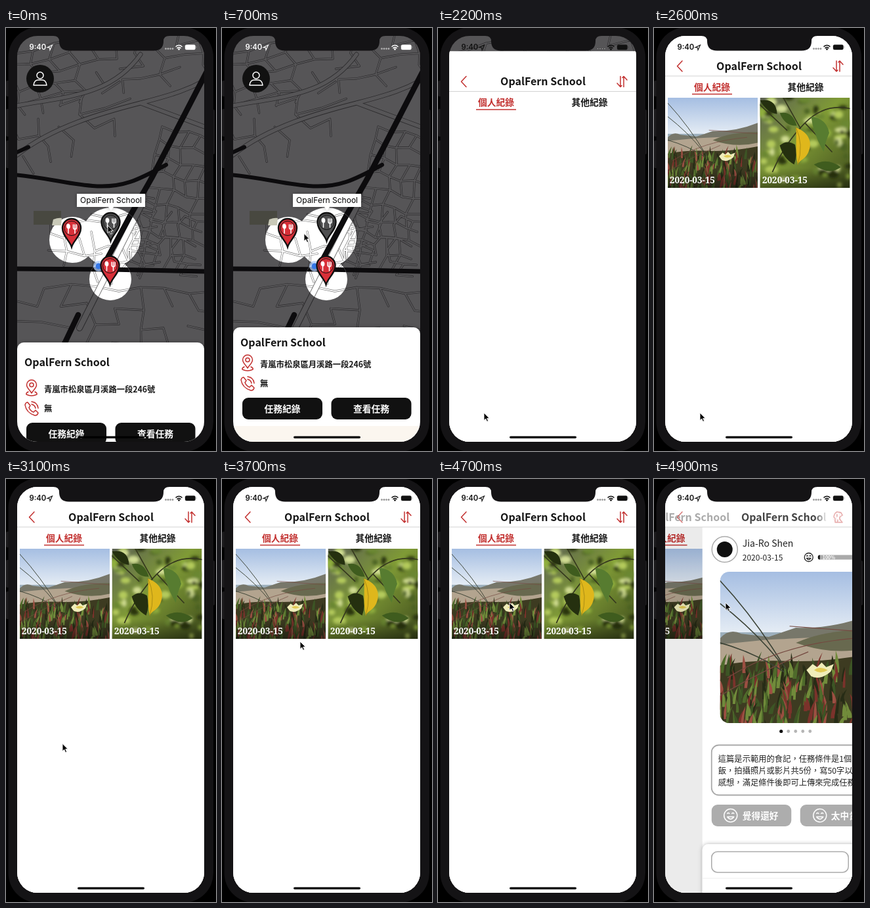
Write an HTML page that moves like this. It is 320x643 px and loops after 5 s.

```html
<!DOCTYPE html>
<html lang="zh-Hant">
<head>
<meta charset="utf-8">
<title>Task map</title>
<style>
html, body { margin: 0; height: 100%; overflow: hidden; background: #000 }
svg { display: block; width: 100vw; height: 100vh }
text { font-family: "Noto Sans CJK TC", "Noto Sans CJK", sans-serif }
.b { font-weight: 700 }
.m { text-anchor: middle }
.ui { font-family: Inter, Roboto, sans-serif }
.date { font: 700 13.5px "Noto Serif", serif; fill: #fff }
.line { fill: none; stroke-linecap: round; stroke-linejoin: round }
.red { stroke: #c2302f; stroke-width: 1.5 }
#map { --bg: #565557; --edge: #2b2a2c; --main: #0c0b0d }
#lit { --bg: #fff; --edge: #777; --main: #0c0b0d }
.ground { fill: var(--bg) }
.edge { stroke: var(--edge) }
.fill { stroke: var(--bg) }
.main { stroke: var(--main) }
</style>
</head>
<body>
<svg viewBox="0 0 320 643">
<defs>
  <clipPath id="screen"><rect x="17" y="12" width="285" height="617" rx="31"/></clipPath>
  <clipPath id="spots"><circle cx="101" cy="322" r="35"/><circle cx="160" cy="318" r="45"/><circle cx="159" cy="382" r="32"/></clipPath>
  <clipPath id="sq"><rect width="100" height="100"/></clipPath>
  <clipPath id="sqRound"><rect width="100" height="100" rx="6"/></clipPath>
  <linearGradient id="sky" x2="0" y2="1"><stop stop-color="#a5bee2"/><stop offset="1" stop-color="#eef3f7"/></linearGradient>
  <linearGradient id="shade" x2="0" y2="1"><stop stop-color="#000" stop-opacity="0"/><stop offset="1" stop-color="#000" stop-opacity=".4"/></linearGradient>
  <linearGradient id="leafBg" x2="1" y2="1"><stop stop-color="#5c6153"/><stop offset=".45" stop-color="#7f9a36"/><stop offset="1" stop-color="#3f4c1c"/></linearGradient>
  <linearGradient id="fade" gradientUnits="userSpaceOnUse" x1="245" x2="264"><stop stop-color="#fff"/><stop offset="1" stop-color="#000"/></linearGradient>
  <mask id="titleMask"><rect width="320" height="643" fill="url(#fade)"/></mask>
  <filter id="soft"><feGaussianBlur stdDeviation="1.6"/></filter>
  <filter id="shadow" x="-20%" y="-20%" width="140%" height="140%"><feDropShadow dx="0" dy="0" stdDeviation="3" flood-opacity=".3"/></filter>

  <g id="streets">
    <rect class="ground" width="320" height="643"/>
    <path class="edge line small" stroke-width="3.2"/>
    <path class="fill line small" stroke-width="1.9"/>
    <g class="line">
      <path class="edge" stroke-width="7" d="M17 193C70 150 150 128 205 114S280 92 302 80M205 114L302 150M17 118C90 104 160 104 205 40"/>
      <path class="fill" stroke-width="5.4" d="M17 193C70 150 150 128 205 114S280 92 302 80M205 114L302 150M17 118C90 104 160 104 205 40"/>
      <path class="edge" stroke-width="10" d="M206 270L112 456"/>
      <path class="fill" stroke-width="8" d="M206 270L112 456"/>
      <path class="main" stroke-width="6" d="M12 223C55 226 85 236 132 240S205 229 244 208M12 191L34 181"/>
      <path class="main" stroke-width="7" d="M12 366L160 367L306 370"/>
      <path class="main" stroke-width="8.5" d="M306 66L222 228L190 284L146 366M110 436L88 482"/>
    </g>
  </g>

  <g id="pin">
    <path d="M0 0C-3-10-14-17-14-29A14 14 0 0 1 14-29C14-17 3-10 0 0Z" stroke="#111" stroke-width="2.4"/>
    <circle cy="-28.5" r="11" fill="none" stroke="#111" stroke-width="1"/>
    <g class="line" stroke="#fff" stroke-width="1.8"><ellipse cx="-5" cy="-31.500" rx="2" ry="3" fill="#fff"/><path d="M-5-28V-21M5-27V-21M2.500-34V-30Q2.500-27 5-27T7.500-30V-34M5-34V-27" stroke-width="1.5"/></g>
  </g>

  <g id="beach" clip-path="url(#sq)">
    <rect width="100" height="46" fill="url(#sky)"/>
    <rect y="40" width="40" height="6" fill="#9db0bd"/>
    <path d="M0 44Q6 37 14 41L32 43L50 37Q75 38 100 28V70H0Z" fill="#77776a"/>
    <path d="M0 48L30 45Q55 44 100 41V72H0Z" fill="#b3a48f"/>
    <path d="M50 47Q70 38 100 38V50Q75 56 50 47" fill="#68694f"/>
    <path d="M0 62Q20 58 45 59T100 54V100H0Z" fill="#3d3b21"/>
    <g id="blades"/>
    <path class="line" stroke="#3b4235" stroke-width=".7" d="M0 6Q24 32 43 64M0 21Q22 38 39 59M0 47Q22 53 42 66"/>
    <path class="line" stroke="#74483f" stroke-width=".5" d="M0 82Q26 66 58 53M46 36L100 40M5 70Q40 48 88 44"/>
    <path d="M57 65L61 61L64 63L67 60L70 63L75 61L73 66Q66 72 60 69Z" fill="#f0edba"/>
    <path d="M62 65Q66 62 71 65Q66 68 62 65" fill="#e2ca55"/>
  </g>

  <g id="leaves" clip-path="url(#sq)">
    <rect width="100" height="100" fill="url(#leafBg)"/>
    <g id="bokeh" filter="url(#soft)"/>
    <path class="line" stroke="#35381e" stroke-width="1.2" d="M14 82Q28 50 50 28T100 12M26 0L45 34M50 28L80 60M0 8L30 36"/>
    <path d="M22 53Q30 46 39 52Q42 64 38 74Q26 68 22 53M0 3Q18 0 19 18Q8 17 0 3" fill="#25300f"/>
    <path d="M57 21Q74 23 77 39Q72 51 71 60Q59 40 57 21" fill="#577c30"/>
    <path d="M22 17Q36 14 41 31Q28 32 22 17M60 74Q75 66 90 77Q76 87 60 74" fill="#3f5c1e"/>
    <path d="M40 33C56 39 58 51 54 60S45 68 42 74C39 61 41 47 40 33Z" fill="#dfb71c"/>
    <path class="line" stroke="#9f8414" stroke-width=".6" d="M40 33Q49 52 42 74"/>
  </g>

  <g id="smile" class="line"><circle r="10"/><path d="M-5 2Q0 9 5 2ZM-5-3Q-3.500-5-2-3M2-3Q3.500-5 5-3"/></g>
</defs>

<rect x="0" y="80" width="6" height="24" rx="2" fill="#1b1a1c"/>
<rect x="0" y="123" width="6" height="42" rx="2" fill="#1b1a1c"/>
<rect x="0" y="171" width="6" height="42" rx="2" fill="#1b1a1c"/>
<rect x="312" y="124" width="6" height="68" rx="2" fill="#1b1a1c"/>
<rect x="3.500" y="-1" width="312.500" height="645" rx="45" fill="#141315"/>

<g clip-path="url(#screen)">
  <g id="home">
    <use id="map" href="#streets"/>
    <path d="M42 278H84V299H42Z" fill="#484840"/>
    <g clip-path="url(#spots)"><use id="lit" href="#streets"/></g>
    <path d="M72 291Q80 288 85 289L84 300H70Z" fill="#c9c9b8"/>
    <circle cx="141" cy="362" r="8" fill="#aecbfa" opacity=".75"/><circle cx="141" cy="362" r="4.500" fill="#3678e8"/>
    <use href="#pin" x="100" y="333" fill="#d82f38"/>
    <use href="#pin" x="159.500" y="324" fill="#4f4f50"/>
    <use href="#pin" x="158.500" y="390" fill="#d82f38"/>
    <g filter="url(#shadow)"><path d="M108 252H212V272H164L160 277L156 272H108Z" fill="#fff"/></g>
    <text class="ui m" x="160" y="266.300" font-size="12">OpalFern School</text>
    <circle cx="52" cy="77" r="21" fill="#111"/>
    <g class="line" stroke="#fff" stroke-width="1.5"><circle cx="52" cy="72" r="5"/><path d="M42 87Q43 79 49 79H55Q61 79 62 87Z"/></g>
    <g id="sheet" filter="url(#shadow)"><rect x="17" width="285" height="220" rx="10" fill="#fff"/></g>
    <rect id="strip" x="17" width="285" height="40" fill="#fbf6ef"/>
    <text id="place" class="b" x="28" font-size="16" fill="#161616">OpalFern School</text>
    <g id="info">
      <g class="line red">
        <path d="M39 517C36 512 31.500 509 31.500 504.500A7.500 7.500 0 0 1 46.500 504.500C46.500 509 42 512 39 517ZM34 515Q30 517 31 519Q39 523 47 519Q48 517 44 515"/><circle cx="39" cy="504.500" r="3"/>
        <path d="M33 531L37 536L35 539Q37 544 42 546L45 543L49 547Q48 551 44 551Q31 547 29 535Q30 531 33 531ZM39 530Q48 531 49 540M39 534Q44 535 45 540"/>
      </g>
      <g class="b" font-size="12.300" fill="#161616"><text x="58" y="515.500">青嵐市松泉區月溪路一段246號</text><text x="58" y="544.500">無</text></g>
      <rect x="31" y="562" width="122" height="33" rx="9" fill="#111"/><rect x="166.500" y="562" width="122" height="33" rx="9" fill="#111"/>
      <g class="b m" font-size="13.800" fill="#fff"><text x="92" y="583.500">任務紀錄</text><text x="227.500" y="583.500">查看任務</text></g>
    </g>
  </g>

  <g id="modal">
    <rect x="17" y="12" width="285" height="640" fill="#fff"/>
    <g id="list">
      <g class="b m" font-size="13.800"><text x="88.500" y="95" fill="#c2302f">個人紀錄</text><text x="231" y="95" fill="#161616">其他紀錄</text></g>
      <path d="M58 100.500H119" stroke="#c2302f" stroke-width="1.600"/>
      <g id="photos">
        <use href="#beach" transform="translate(21 106) scale(1.370)"/>
        <use href="#leaves" transform="translate(161.500 106) scale(1.370)"/>
        <path d="M21 213H158V243H21ZM161.500 213H298.500V243H161.500Z" fill="url(#shade)"/>
        <text class="date" x="24" y="236">2020-03-15</text><text class="date" x="165" y="236">2020-03-15</text>
      </g>
    </g>
    <rect id="dim" x="17" y="73" width="285" height="560"/>
    <g id="detail">
      <rect x="17" y="73" width="285" height="560" fill="#fff"/>
      <circle cx="51" cy="107" r="19.500" fill="#fff" stroke="#aaa" stroke-width="1.500"/><circle cx="51" cy="107" r="12" fill="#111"/>
      <text x="78" y="102.500" font-size="14" font-weight="500" fill="#222">Jia-Ro Shen</text>
      <text x="78" y="123.500" font-size="12" fill="#222">2020-03-15</text>
      <use href="#smile" transform="translate(179 119) scale(.65)" stroke="#222" stroke-width="2"/>
      <rect x="193" y="115.500" width="84" height="7" rx="3.500" fill="#aaa"/><path d="M196 115.500Q193 115.500 193 119T196 122.500Z" fill="#111"/>
      <text class="b" x="200" y="121.700" font-size="7" fill="#fff">100%</text>
      <g transform="translate(44 141) scale(2.310 2.300)" clip-path="url(#sqRound)"><use href="#beach"/></g>
      <g fill="#b5b5b5"><circle cx="137" cy="383.500" r="2.600" fill="#111"/><circle cx="148" cy="383.500" r="2.400"/><circle cx="159" cy="383.500" r="2.400"/><circle cx="170" cy="383.500" r="2.400"/><circle cx="181" cy="383.500" r="2.400"/></g>
      <rect x="31" y="404.500" width="257" height="76" rx="11" fill="#fff" stroke="#aaa" stroke-width="1.800"/>
      <g font-size="12.300" fill="#222"><text x="41" y="429.500">這篇是示範用的食記，任務條件是1個</text><text x="41" y="447.500">飯，拍攝照片或影片共5份，寫50字以</text><text x="41" y="465.500">感想，滿足條件後即可上傳來完成任務</text></g>
      <rect x="31" y="495" width="121.500" height="33" rx="9" fill="#adadad"/><rect x="166" y="495" width="121.500" height="33" rx="9" fill="#adadad"/>
      <g stroke="#fff" stroke-width="1.500"><use href="#smile" x="60" y="511.500"/><use href="#smile" x="196" y="511.500"/></g>
      <g class="b" font-size="13.700" fill="#fff"><text x="78" y="516.500">覺得還好</text><text x="213" y="516.500">太中肯了</text></g>
      <g filter="url(#shadow)"><rect x="17" y="555" width="285" height="90" rx="9" fill="#fff"/></g>
      <rect x="31" y="566.500" width="208.500" height="31.500" rx="9" fill="#fff" stroke="#aaa" stroke-width="1.500"/>
      <path d="M17 607H302" stroke="#eee"/>
    </g>
    <rect x="17" y="12" width="285" height="60.500" fill="#fff"/><path d="M17 73H302" stroke="#d2d2d2"/>
    <g class="b m" font-size="16" fill="#161616">
      <text id="oldTitle" x="160" y="64">OpalFern School</text>
      <g mask="url(#titleMask)"><text id="newTitle" x="160" y="64">OpalFern School</text></g>
    </g>
    <path id="back" class="line red" d="M43 50L35.500 58L43 66"/>
    <path id="sort" class="line red" d="M278 50V66L273 60.500M278 66L280 64M283 66V50L288 55.500M283 50L281 52"/>
    <path id="pet" class="line red" d="M276 66V60L274 58Q275 51 279 50L285 51L287 55L283 58V61L287 66ZM280 66V62M279 54V57"/>
  </g>

  <g id="status">
    <text class="ui" x="35.500" y="33.300" font-size="11.300" font-weight="600" stroke="none">9:40</text>
    <path d="M63 29.500L70.500 26L67 33.500L66.500 30Z" fill="none" stroke-width="1.100"/>
    <g fill="#aaa"><circle cx="243.500" cy="31.500" r="1.100"/><circle cx="247" cy="31.500" r="1.100"/><circle cx="250.500" cy="31.500" r="1.100"/><circle cx="254" cy="31.500" r="1.100"/></g>
    <path d="M258.500 28.500Q263.500 24 268.500 28.500M260.500 30.800Q263.500 28 266.500 30.800" fill="none" stroke-width="1.600"/><circle cx="263.500" cy="32.300" r="1.200"/>
    <rect x="273" y="25.500" width="15.500" height="7.500" rx="2"/><path d="M290 28V30.500"/>
  </g>
  <rect x="109" y="620.500" width="102" height="3.200" rx="1.600"/>
</g>
<path d="M72 10V12Q81 12 81 20Q81 34.500 96 34.500H225Q240 34.500 240 20Q240 12 249 12V10Z" fill="#141315"/>
<path id="cursor" d="M0 0V11.500L2.700 9L4.600 13.300L6.600 12.400L4.700 8.300H8.300Z" stroke="#fff" stroke-width=".9"/>
</svg>
<script>
const $ = id => document.getElementById(id);
let seed = 11;
const rnd = (a = 0, b = 1) => a + (b - a) * ((seed = seed * 16807 % 2147483647) / 2147483647);
const pick = list => list[Math.floor(rnd(0, list.length))];
const lerp = (a, b, k) => a + (b - a) * k;
const move = (id, x, y) => $(id).setAttribute('transform', `translate(${x} ${y})`);
const fade = (id, k) => $(id).setAttribute('opacity', k);

// Slightly warped street grid, tilted by deg, with random gaps
function grid(x, y, cols, rows, w, h, deg, keep) {
  const a = deg * Math.PI / 180;
  const at = (i, j) => {
    const u = i * w + w * .2 * Math.sin(i * 7 + j * 3), v = j * h + h * .16 * Math.sin(i * 2 + j * 5);
    return (x + u * Math.cos(a) - v * Math.sin(a)).toFixed(1) + ' ' + (y + u * Math.sin(a) + v * Math.cos(a)).toFixed(1);
  };
  let d = '';
  for (let i = 0; i < cols; i++) for (let j = 0; j < rows; j++) {
    if (rnd() < keep) d += `M${at(i, j)}L${at(i + 1, j)}`;
    if (rnd() < keep) d += `M${at(i, j)}L${at(i, j + 1)}`;
  }
  return d;
}
const streets = grid(5, 40, 10, 5, 32, 19, -12, .75) + grid(10, 150, 5, 3, 36, 25, -22, .5)
  + grid(238, 150, 5, 9, 19, 23, 14, .85) + grid(128, 262, 4, 5, 24, 25, -4, .7)
  + grid(68, 292, 3, 3, 25, 24, 3, .6) + grid(14, 390, 8, 4, 39, 29, 2, .6)
  + grid(205, 270, 5, 6, 22, 17, 14, .7);
document.querySelectorAll('.small').forEach(p => p.setAttribute('d', streets));

let blades = '';
for (let i = 0; i < 210; i++) {
  const x = rnd(-2, 102), y = 66 + i / 5, h = rnd(7, 15), lean = rnd(-3, 4), w = rnd(.7, 1.5);
  blades += `<path d="M${x - w} ${y}Q${x - w} ${y - h / 2} ${x + lean} ${y - h}Q${x + w * 1.5} ${y - h / 2} ${x + w} ${y}" fill="${pick(['#4f6b2b', '#718b3b', '#7b322b', '#9c4f42', '#272c16', '#3d5525'])}"/>`;
}
$('blades').innerHTML = blades;

let bokeh = '';
for (let i = 0; i < 75; i++)
  bokeh += `<ellipse cx="${rnd(0, 100)}" cy="${rnd(0, 100)}" rx="${rnd(2, 7)}" ry="${rnd(2, 5)}" fill="${pick(['#b4ca5c', '#8fae3e', '#d0dc92', '#4c6222', '#29360f', '#6b8730'])}"/>`;
$('bokeh').innerHTML = bokeh;

// time, x, y
const trail = [[0, 155, 300], [600, 155, 300], [1000, 35, 350], [1200, 52, 406], [1400, 70, 585], [2600, 70, 585],
  [3000, 80, 428], [3600, 116, 274], [3700, 119, 247], [3900, 118, 244], [4300, 109, 188], [5000, 109, 188]];
function pointer(t) {
  const i = trail.findIndex(p => p[0] > t), [t0, x0, y0] = trail[i - 1], [t1, x1, y1] = trail[i];
  const k = (t - t0) / (t1 - t0);
  move('cursor', lerp(x0, x1, k), lerp(y0, y1, k));
}
// Distance left of a critically damped spring
const spring = (ms, w) => ms <= 0 ? 1 : (1 + w * ms) * Math.exp(-w * ms);

function draw(t) {
  const up = 1 - (1 - Math.min(t / 500, 1)) ** 3;
  move('sheet', 0, lerp(478, 455, up));
  move('place', 0, lerp(514, 484, up));
  move('info', 0, lerp(38, 0, up));
  move('strip', 0, lerp(645, 605, up));

  const below = t >= 2500 ? 0 : spring(t - 1800, .01275);
  move('modal', 0, below * 631);
  $('photos').style.display = t >= 2500 ? '' : 'none';
  const ink = t >= 1900 ? '#111' : '#fff';
  $('status').setAttribute('fill', ink);
  $('status').setAttribute('stroke', ink);
  $('status').setAttribute('stroke-width', 0.3);

  const left = spring(t - 4700, .015), p = 1 - left;
  move('list', -85.5 * p, 0);
  move('detail', 285 * left, 0);
  $('detail').style.display = p ? '' : 'none';
  fade('dim', .1 * p);
  move('oldTitle', -137 * p, 0);
  fade('oldTitle', p ? Math.max(0, 1 - .8 * p) : 1);
  move('newTitle', 190 * left, 0);
  fade('newTitle', p);
  fade('back', 1 - .6 * Math.sin(Math.PI * p));
  fade('sort', Math.max(0, 1 - 1.15 * p));
  fade('pet', p * p * .6);
  pointer(t);
}
const start = performance.now();
function tick() {
  draw(Math.floor((performance.now() - start) / 100) * 100 % 5000);
  requestAnimationFrame(tick);
}
tick();
</script>
</body>
</html>
```
